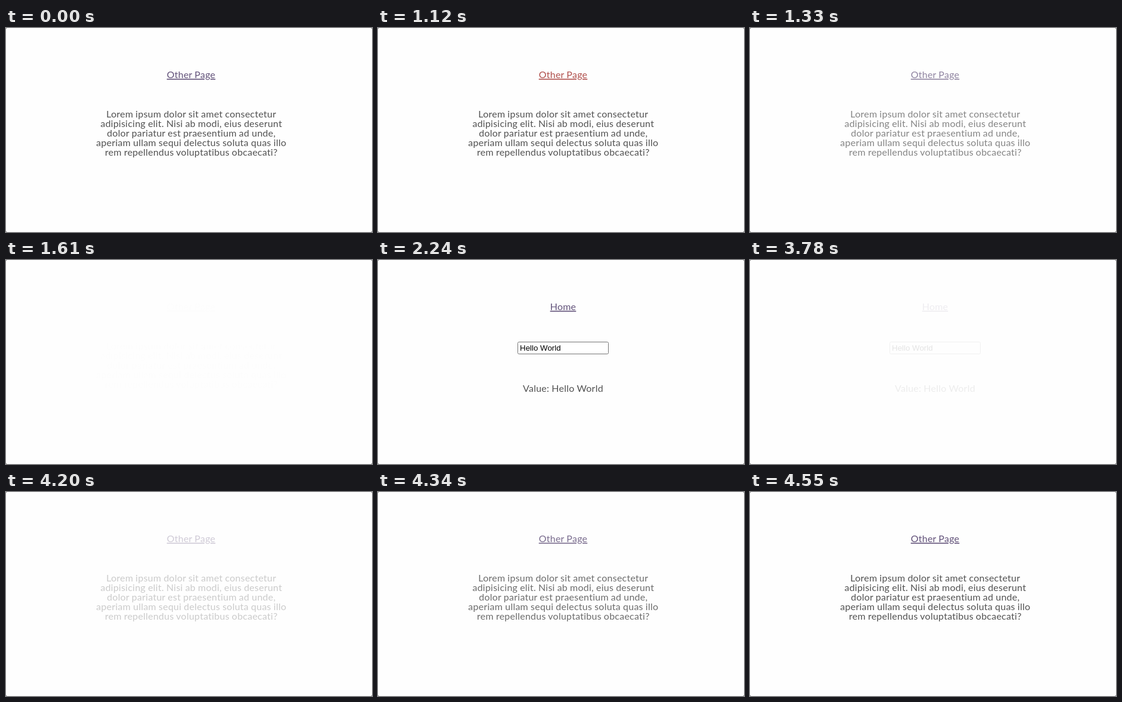
These frames come from a looping animation (614 px wide and 342 px high, 5.81 s). An HTML page:

```html
<!DOCTYPE html>
<html lang="en">
<head>
<meta charset="utf-8">
<title>Page transition</title>
<style>
  html, body { margin: 0; width: 100%; height: 100%; overflow: hidden; background: #555; }
  svg { display: block; width: 614px; height: 342px; }
  text {
    font: 16px Lato, "Open Sans", sans-serif;
    letter-spacing: .24px;
    word-spacing: -.3px;
    text-anchor: middle;
    fill: #525252;
  }
  .link {
    fill: #62527a;
    text-decoration: underline;
    text-decoration-thickness: 1px;
    text-underline-offset: 1px;
  }
  .link.active { fill: #b0504c; }
  .field {
    font: 13.333px "Liberation Sans", Arial, sans-serif;
    letter-spacing: 0;
    word-spacing: 0;
    text-anchor: start;
    fill: #000;
  }
</style>
</head>
<body>
<svg viewBox="0 0 614 342">
  <rect width="614" height="342" rx="2" fill="#fefefe"/>
  <g id="home">
    <text class="link" x="310.5" y="84">Other Page</text>
    <text x="310.8" y="150">Lorem ipsum dolor sit amet consectetur</text>
    <text x="310.8" y="166">adipisicing elit. Nisi ab modi, eius deserunt</text>
    <text x="310.8" y="182">dolor pariatur est praesentium ad unde,</text>
    <text x="310.8" y="198">aperiam ullam sequi delectus soluta quas illo</text>
    <text x="310.8" y="214">rem repellendus voluptatibus obcaecati?</text>
  </g>
  <g id="other">
    <text class="link" x="310.5" y="84">Home</text>
    <rect x="234.5" y="137.5" width="152" height="20" rx="2" fill="#fff" stroke="#767676"/>
    <text class="field" x="238" y="152">Hello World</text>
    <text x="310.5" y="221">Value: Hello World</text>
  </g>
</svg>
<script>
const LOOP = 5810, STEP = 70, FADE = 400;
const home = document.getElementById('home');
const other = document.getElementById('other');

// CSS "ease": cubic-bezier(.25, .1, .25, 1), solved by bisection
function ease(x) {
  if (x <= 0) return 0;
  if (x >= 1) return 1;
  const bezier = (s, a, b) => 3 * s * (1 - s) * (1 - s) * a + 3 * s * s * (1 - s) * b + s ** 3;
  let lo = 0, hi = 1;
  for (let i = 0; i < 24; i++) {
    const mid = (lo + hi) / 2;
    if (bezier(mid, .25, .25) < x) lo = mid; else hi = mid;
  }
  return bezier(lo, .1, 1);
}

const fade = (t, start) => ease((t - start) / FADE);

function show(page, opacity, active) {
  page.style.opacity = opacity;
  page.style.display = opacity > 0 ? '' : 'none';
  page.querySelector('.link').classList.toggle('active', active);
}

function draw(now) {
  const t = Math.floor((now % LOOP) / STEP) * STEP;
  show(home, 1 - fade(t, 1250) + fade(t, 4120), t >= 1120 && t < 1260);
  show(other, fade(t, 1810) - fade(t, 3530), t >= 3500 && t < 3570);
}

const begin = performance.now();
function tick() {
  draw(performance.now() - begin);
  requestAnimationFrame(tick);
}
tick();
</script>
</body>
</html>
```
